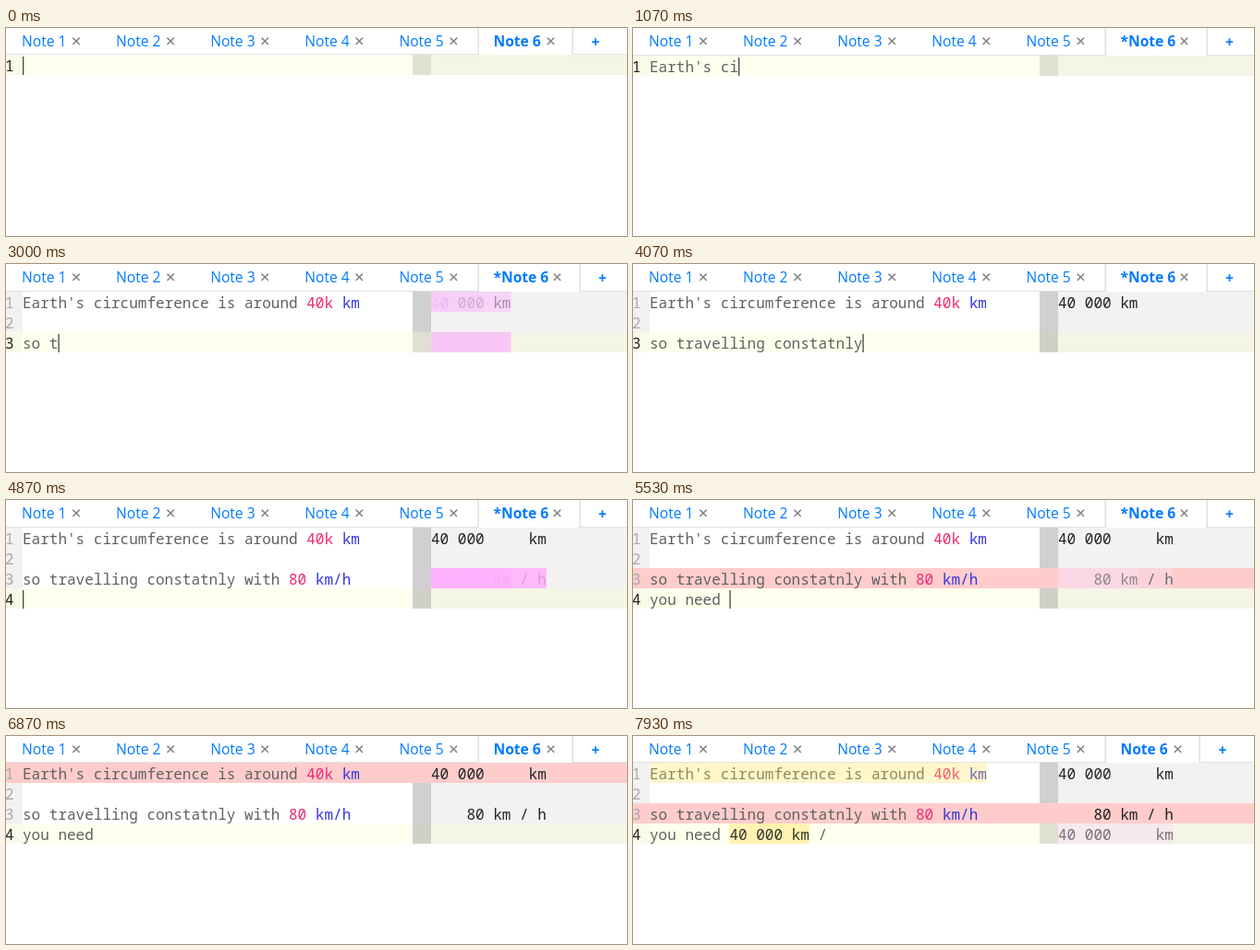
An HTML page that plays this animation: 672 by 226 pixels, repeating every 8000 ms.

```html
<!DOCTYPE html>
<html>
<head>
<meta charset="utf-8">
<style>
html, body { margin: 0; width: 100%; height: 100%; overflow: hidden; background: #fff; }
svg { display: block; }
text { white-space: pre; }
.code { font: 16px "Noto Sans Mono", monospace; }
.tab { font: 15.6px "Open Sans", sans-serif; fill: #007bff; }
.bold { font-weight: bold; }
</style>
</head>
<body>
<svg id="stage" width="672" height="226"></svg>
<script>
const LOOP = 8000, CW = 9.6, LH = 22, LEFT = 18, BAR = 440, RES = 460;
const SCRIPT = "Earth's circumference is around 40k km\n\nso travelling constatnly with 80 km/h\nyou need ";
const INSERT = 7270;
const stage = document.getElementById("stage");

const keyTime = n => 485 + n * 56;
const typedCount = t => t < 530 ? 0 : Math.max(1, Math.floor((t - 485) / 56));

// result flashes: start time, row, width in characters
const pulses = [
  [keyTime(33), 0, 1], [keyTime(34), 0, 2], [keyTime(35), 0, 6], [keyTime(38), 0, 9],
  [keyTime(41), 2, 9],
  [keyTime(71), 2, 6], [keyTime(72), 2, 6], [keyTime(75), 2, 9], [keyTime(77), 2, 13],
  [INSERT, 3, 13]
];

const rect = (x, y, w, h, fill) =>
  `<rect x="${x}" y="${y}" width="${w}" height="${h}" fill="${fill}"/>`;
const text = (x, y, s, cls, fill = "") =>
  `<text x="${x}" y="${y}" class="${cls}" ${fill && `fill="${fill}"`}>${s}</text>`;
const cross = x =>
  `<path d="M${x - 3.7} 10.6l7.4 7.4m0-7.4l-7.4 7.4" stroke="#858585" stroke-width="1.5"/>`;

const colorize = s => s
  .replace(/\d+k?/g, '<tspan fill="#f0286e">$&</tspan>')
  .replace(/km(\/h)?/g, '<tspan fill="#3434dc">$&</tspan>');

function pulseColor(p) {
  const mix = (a, b) => Math.round(a + (b - a) * p);
  return `rgba(${mix(255, 242)},${mix(170, 242)},${mix(255, 242)},${0.9 * (1 - p) ** 0.7})`;
}

function tabs(dirty) {
  const edge = dirty ? 620.5 : 612.5, y = dirty ? 29 : 28;
  let out = rect(0, y, 511, 1, "#dee2e6") + rect(edge, y, 672 - edge, 1, "#dee2e6")
    + rect(510.5, 0, 1.2, y + 1, "#d5d9dd") + rect(edge, 0, 1.2, y + 1, "#d5d9dd");
  for (let i = 0; i < 5; i++) {
    const x = 17 + i * 102.1;
    out += text(x, 20, "Note " + (i + 1), "tab") + cross(x + 59);
  }
  return out + text(527.5, 20, (dirty ? "*" : "") + "Note 6", "tab bold")
    + cross(dirty ? 596.5 : 589.5) + text(dirty ? 641 : 633.6, 21, "+", "tab bold");
}

function results(n, t) {
  const wide = n >= 77;
  const first = n < 33 ? "" : n < 34 ? "4" : n < 35 ? "40" : n < 38 ? "40 000"
    : wide ? "40 000     km" : "40 000 km";
  const third = n < 71 ? "" : n < 72 ? "     8" : n < 75 ? "    80"
    : wide ? "    80 km / h" : "    80 km";
  return [first, "", third, t < INSERT ? "" : "40 000     km"];
}

function selectedRow(t) {
  if (t >= 5465 && t < 6070) return 2;
  if (t >= 6070 && t < 6665) return 1;
  if (t >= 6665 && t < INSERT) return 0;
  return t >= 7660 ? 2 : -1;
}

function render(t) {
  const dirty = (t >= 530 && t < 5800) || (t >= INSERT && t < 7900);
  const top = dirty ? 30 : 29;
  const n = typedCount(t);
  const lines = SCRIPT.slice(0, n).split("\n");
  const active = lines.length - 1;
  const inserted = t >= INSERT;
  if (inserted) lines[3] += "40 000 km" + " / ".slice(0, t < 7400 ? 0 : t < 7465 ? 1 : t < 7530 ? 2 : 3);
  const selected = selectedRow(t), values = results(n, t);
  const lightBar = t < 3500 || inserted;
  let out = tabs(dirty);

  lines.forEach((line, i) => {
    const y = top + i * LH, base = y + 18, on = i === active;
    if (i === selected) {
      out += rect(0, y, 672, LH, "#ffcccc");
    } else {
      out += rect(0, y, LEFT, LH, on ? "#fafaeb" : "#f2f2f2")
        + rect(LEFT, y, BAR - LEFT, LH, on ? "#ffffee" : "#fff")
        + rect(BAR, y, RES - BAR, LH, on ? (lightBar ? "#e0e0d2" : "#d0d0c8") : "#d0d0d0")
        + rect(RES, y, 672 - RES, LH, on ? "#f5f5e6" : "#f2f2f2");
    }
    out += text(-1, base, i + 1, "code", on ? "#222" : "#a8a8a8");
    if (i === 3 && inserted) {
      out += rect(LEFT + 9 * CW, y, 9 * CW, LH, "#fff3b0")
        + text(LEFT, base, `you need <tspan fill="#333">40 000 km</tspan>${line.slice(18)}`, "code", "#606060");
    } else {
      out += text(LEFT, base, colorize(line), "code", "#606060");
    }
    out += text(RES, base, values[i], "code", "#222");
  });

  if (inserted) out += rect(LEFT, top, 38 * CW, LH, "rgba(255,225,88,.3)");
  for (const [start, row, width] of pulses) {
    const p = (t - start) / 1000;
    if (p >= 0 && p < 1) out += rect(RES, top + row * LH, width * CW, LH, pulseColor(p));
  }
  const cursorOn = t < 5860 || Math.floor((t - 5860) / 500) % 2 === 1;
  if (cursorOn) out += rect(LEFT + lines[active].length * CW, top + active * LH + 2, 1.3, 20, "#444");
  stage.innerHTML = out;
}

function frame() {
  render(performance.now() % LOOP);
  requestAnimationFrame(frame);
}
frame();
</script>
</body>
</html>
```
